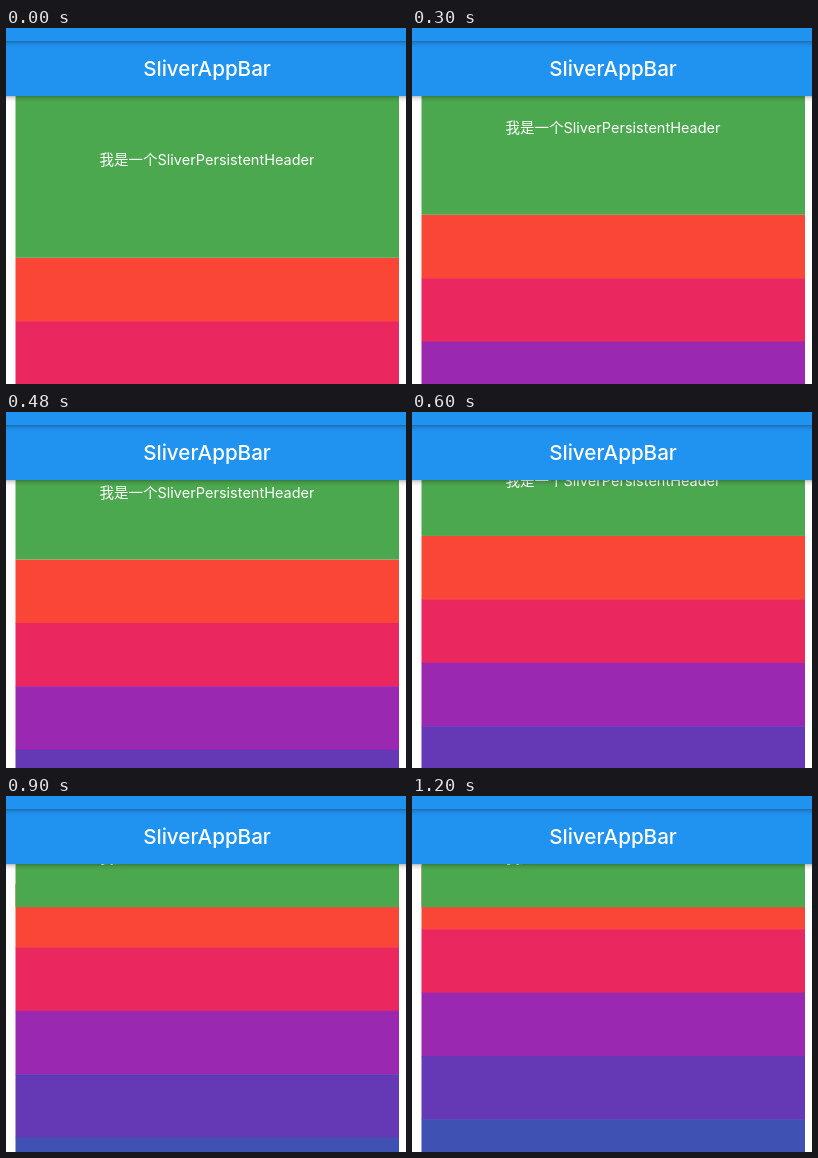
Animation, 400 px wide and 356 px high, one loop 1.26 s. Source, as an HTML page:

```html
<!DOCTYPE html>
<html lang="zh-CN">
<head>
<meta charset="utf-8">
<title>SliverAppBar</title>
<style>
html, body { margin: 0; width: 100%; height: 100%; overflow: hidden; background: #fff; }
svg { display: block; width: 100vw; height: 100vh; }
text { fill: #fff; font-family: Inter, "Noto Sans CJK SC", "Noto Sans CJK", sans-serif; text-anchor: middle; }
</style>
</head>
<body>
<svg viewBox="0 0 400 356" preserveAspectRatio="none">
  <defs>
    <linearGradient id="shade" x2="0" y2="1">
      <stop offset="0" stop-opacity=".26"/>
      <stop offset=".4" stop-opacity=".1"/>
      <stop offset="1" stop-opacity="0"/>
    </linearGradient>
  </defs>
  <rect width="400" height="356" fill="#fff"/>
  <g id="list"></g>
  <rect id="header" x="9.5" y="60" width="383.5" fill="#4ba84e"/>
  <text id="label" x="201" font-size="14.5">我是一个SliverPersistentHeader</text>
  <rect y="68" width="400" height="6" fill="url(#shade)"/>
  <rect width="400" height="68" fill="#2092ef"/>
  <rect y="13" width="400" height="6" fill="url(#shade)"/>
  <text x="201" y="48.3" font-size="20.6" font-weight="500">SliverAppBar</text>
</svg>
<script>
const LOOP = 1260, STEP = 60, BAR = 68, MIN = 43.2, ROW = 63.4;
const COLORS = ['#fa4636', '#ea285f', '#9a28b0', '#6539b5', '#3f51b3'];
// [time, top of the list]
const PATH = [[0, 229.8], [180, 204.6], [300, 186.8], [480, 147.5], [720, 104.8], [900, 88], [1200, 69.8]];
const $ = id => document.getElementById(id);

const rows = COLORS.map(color => {
  const r = document.createElementNS('http://www.w3.org/2000/svg', 'rect');
  const attrs = { x: 9.5, width: 383.5, height: ROW + 0.5, fill: color };
  for (const k in attrs) r.setAttribute(k, attrs[k]);
  $('list').append(r);
  return r;
});

const rate = i => (PATH[i + 1][1] - PATH[i][1]) / (PATH[i + 1][0] - PATH[i][0]);
const last = PATH.length - 1;
// Harmonic mean of neighbouring rates keeps the curve monotone.
const slopes = PATH.map((_, i) => {
  if (i === 0) return rate(0);
  if (i === last) return rate(last - 1);
  const a = rate(i - 1), b = rate(i);
  return 2 * a * b / (a + b);
});

function listTop(t) {
  if (t >= PATH[last][0]) return PATH[last][1];
  let i = 0;
  while (t >= PATH[i + 1][0]) i++;
  const [t0, y0] = PATH[i], [t1, y1] = PATH[i + 1];
  const d = t1 - t0, u = (t - t0) / d, v = 1 - u;
  return (1 + 2 * u) * v * v * y0 + u * v * v * d * slopes[i]
    + u * u * (3 - 2 * u) * y1 - u * u * v * d * slopes[i + 1];
}

function draw(t) {
  const top = listTop(t);
  const height = Math.max(MIN, top - BAR);
  const lag = 10.5 * Math.max(0, 1 - t / 180) ** 2;
  rows.forEach((r, i) => r.setAttribute('y', top + i * ROW));
  $('header').setAttribute('height', BAR + height - 60);
  $('label').setAttribute('y', BAR + height / 2 - 22.2 + lag);
}

const start = performance.now();
function tick() {
  const t = (performance.now() - start) % LOOP;
  draw(Math.floor(t / STEP) * STEP);
  requestAnimationFrame(tick);
}
draw(0);
requestAnimationFrame(tick);
</script>
</body>
</html>
```
